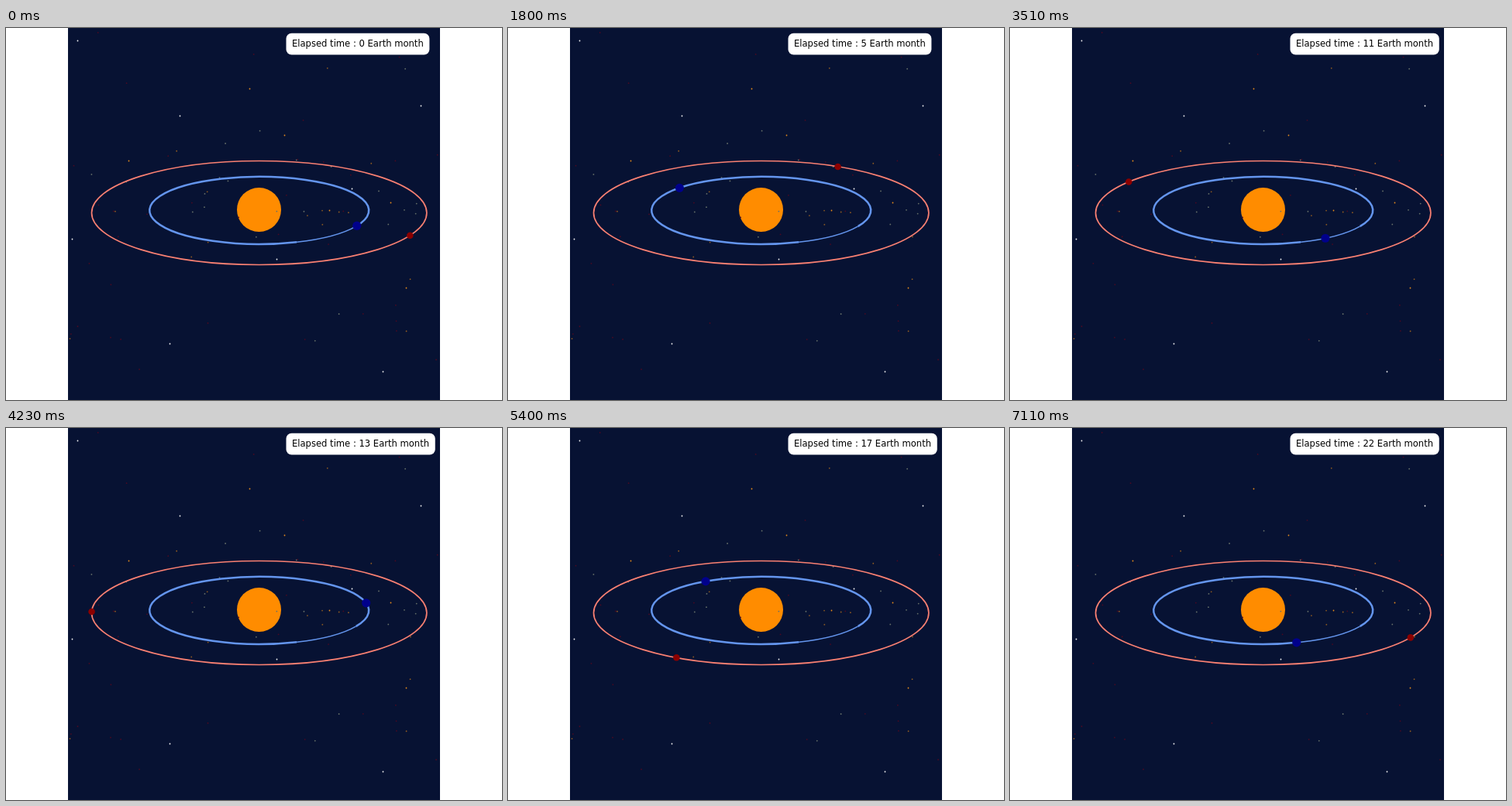
An HTML page with a canvas for the animation above (7200 ms loop, 640 by 480 pixels).

```html
<!DOCTYPE html>
<html>
<head>
<meta charset="utf-8">
<style>
html, body { margin: 0; width: 640px; height: 480px; overflow: hidden; background: #fff; }
canvas { display: block; }
</style>
</head>
<body>
<canvas id="stage" width="640" height="480"></canvas>
<script>
const ctx = document.getElementById('stage').getContext('2d');
const STEP = 90, STEPS = 80, RAD = Math.PI / 180;
const MONTHS_PER_STEP = 687 / 80 / 30;

const sun = { x: 326.5, y: 234.5, r: 28.5 };
const earth = { x: 326.7, y: 235.4, rx: 141.5, ry: 43.5 };
const mars = { x: 326.7, y: 238.5, rx: 216.2, ry: 67 };

const brightStars = [[92, 16], [224, 113], [535, 100], [446, 207], [85, 272],
  [211, 407], [486, 443], [349, 298]];
const warmStars = [[314, 78], [359, 138], [158, 171], [417, 235], [496, 225], [516, 335]];

let seed = 7;
function random() {
  seed = (seed * 16807) % 2147483647;
  return seed / 2147483647;
}

// Faint stars gather around the orbital plane
function scatter(count, color) {
  return Array.from({ length: count }, () => {
    const x = 82 + 476 * random();
    const spread = random() * 2 - 1;
    return { x, y: 236 + 232 * spread * Math.abs(spread), color };
  });
}

const stars = [
  ...brightStars.map(([x, y]) => ({ x, y, color: '#f2f2f2' })),
  ...warmStars.map(([x, y]) => ({ x, y, color: '#e28a1c' })),
  ...scatter(16, '#8d5a22'),
  ...scatter(22, '#667069'),
  ...scatter(36, '#4a0a22')
];

function disc(x, y, r, color) {
  ctx.fillStyle = color;
  ctx.beginPath();
  ctx.arc(x, y, r, 0, 2 * Math.PI);
  ctx.fill();
}

function orbit({ x, y, rx, ry }, color, width, from = 0, to = 360) {
  ctx.strokeStyle = color;
  ctx.lineWidth = width;
  ctx.beginPath();
  ctx.ellipse(x, y, rx, ry, 0, from * RAD, to * RAD);
  ctx.stroke();
}

// The near side of each orbit is passed faster: solve angle = mean + a cos + b sin
function orbitAngle(meanDegrees, a, b) {
  const mean = meanDegrees * RAD;
  let angle = mean;
  for (let i = 0; i < 6; i++) angle = mean + a * Math.cos(angle) + b * Math.sin(angle);
  return angle;
}

function planet({ x, y, rx, ry }, angle, r, color) {
  disc(x + rx * Math.cos(angle), y - ry * Math.sin(angle), r, color);
}

function label(months) {
  const text = `Elapsed time : ${months} Earth month`;
  ctx.font = '11.57px "DejaVu Sans", sans-serif';
  ctx.fillStyle = '#fff';
  ctx.beginPath();
  ctx.roundRect(361.5, 6.8, ctx.measureText(text).width + 15.2, 27.8, 7);
  ctx.fill();
  ctx.fillStyle = '#000';
  ctx.fillText(text, 369, 24);
}

function draw(n) {
  ctx.fillStyle = '#fff';
  ctx.fillRect(0, 0, 640, 480);
  ctx.fillStyle = '#071233';
  ctx.fillRect(80, 0, 480, 480);

  disc(sun.x, sun.y, sun.r, '#ff8c00');
  for (const { x, y, color } of stars) disc(x + 0.5, y + 0.5, 0.9, color);

  orbit(mars, '#fa8072', 1.7);
  orbit(earth, '#6495ed', 1.6, 28, 70);
  orbit(earth, '#6495ed', 2.5, 70, 388);
  planet(earth, orbitAngle(-29.4 + 8.469 * n + 0.001026 * n * n, 0.0367, -0.019), 5.6, '#00008b');
  planet(mars, orbitAngle(-29.7 + 4.525 * n, 0.075, 0), 4.3, '#8b0000');

  label(Math.floor(n * MONTHS_PER_STEP));
}

function tick() {
  draw(Math.floor(performance.now() / STEP) % STEPS);
  requestAnimationFrame(tick);
}
tick();
</script>
</body>
</html>
```
